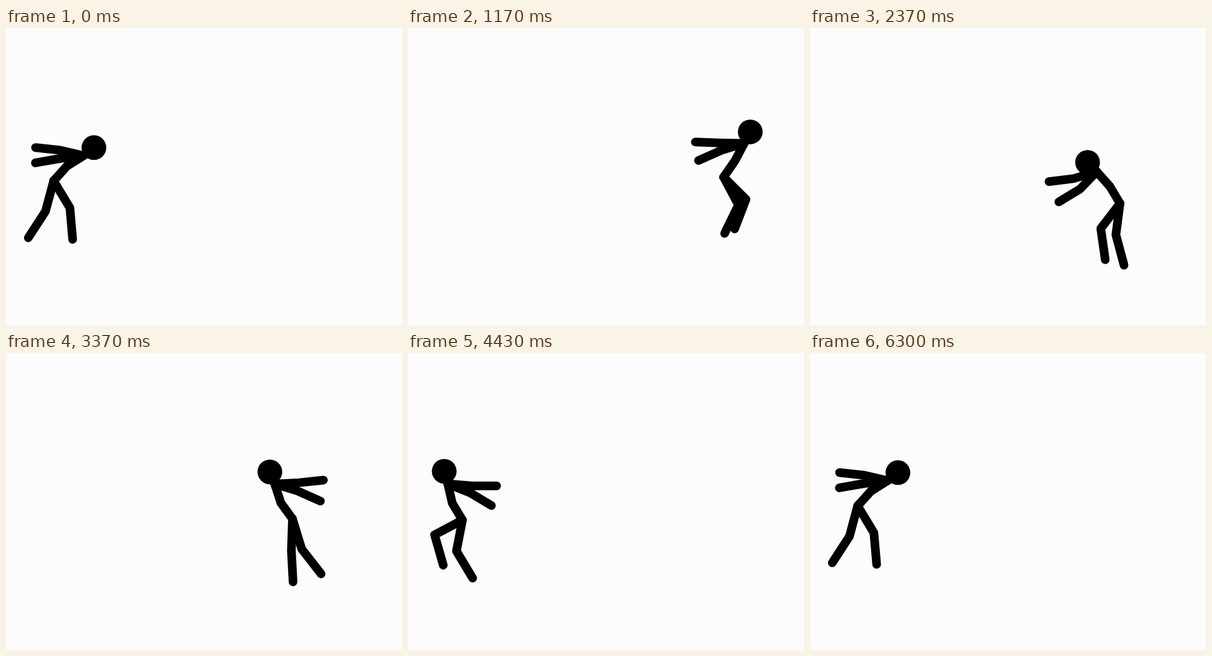
Write an HTML page with a canvas that moves like this. It is 640 px wide and 480 px high and loops after 6.36 s.

```html
<!DOCTYPE html>
<html lang="en">
<head>
<meta charset="utf-8">
<title>Running stick figure</title>
<style>
  html, body { margin: 0; width: 100%; height: 100%; overflow: hidden; background: #fcfcfd; }
  canvas { display: block; }
</style>
</head>
<body>
<canvas id="stage" width="640" height="480"></canvas>
<script>
const ctx = document.getElementById('stage').getContext('2d');
const LOOP = 6360, FPS = 30, LAST = 189;

// Joint angles in degrees for a figure facing right: 0 is right, 90 is down.
// Upper body: lower back, upper back, neck, then both arms (upper, lower).
const lean = [-48, -32, -38, 193, 186, 173, 170];
const jog = [-54, -72, -68, 183, 186, 163, 156];
const climb = [-59, -77, -74, 175, 180, 158, 149];
const flip = [180, 194.5, 196, 236, 233, 236, 233];
const armsUp = [-84, -88, -88, -80, -86, -98, -92];
const reach = [-60, -45, -42, 10, 0, 35, 20];
const ready = [-54, -72, -68, 65, 55, 125, 110];
const fall = [-94, -79, -79, -13, -7, 54, 46];

// Legs: thigh and shin of each.
const tuck = [-54, 22, -87, -31];
const land = [50, 100, 80, 105];
const crouch = [10, 90, 40, 125];
const stand = [70, 85, 100, 105];
const push = [128, 140, 60, 85];
const drop = [29, 92, 62, 100];

// One leg through a full running cycle; the other is half a cycle away.
const cycle = [[105, 123], [87, 121], [28, 106], [59, 85], [54, 83], [79, 121]];
const stride = i => [...cycle[i % 6], ...cycle[(i + 3) % 6]];

const keys = [];
function key(frame, x, y, upper, legs, facing = 1, turn = 0) {
  const angles = [...upper, ...legs].map(a => (facing > 0 ? a : 180 - a) + turn);
  keys.push({ frame, x, y, angles });
}

// Run right, gathering speed
for (let i = 0; i <= 20; i++) {
  const f = i <= 13 ? i * 22 / 13 : 22 + (i - 13) * 11 / 7;
  const x = f <= 22 ? 77 + 2.75 * f + 0.34 * f * f : 302 + 15.3 * (f - 22);
  key(f, x, 247, lean, stride(i));
}
// Up the right wall and backflip
key(36, 530, 238, climb, stride(5));
key(39, 575, 222, climb, stride(8), 1, -15);
key(44, 553, 190, climb, stride(11), 1, -60);
key(49, 549, 175, flip, tuck);
key(52, 518, 160, flip, tuck, 1, -80);
key(55, 478, 215, flip, tuck, 1, -170);
key(58, 485, 278, armsUp, land);
// Crouch, turn round, wait
key(63, 482, 300, reach, crouch);
key(70, 500, 285, reach, land, -1);
key(78, 508, 273, ready, stand, -1);
key(85, 508, 270, ready, stand, -1);
key(90, 508, 270, ready, stand, -1);
// Run left
const leftX = n => 463 - 7.08 * n - 0.177 * n * n;
key(101, 463, 268, jog, [107, 128, 88, 93], -1);
for (let i = 0; i < 12; i++) {
  const n = 3 + i * 25 / 12;
  key(101 + n, leftX(n), 268 + 12 * Math.min(1, n / 8), jog, stride(i), -1);
}
key(129, 126, 278, jog, push, -1);
// Up the left wall
key(133, 88, 270, climb, stride(2), -1);
key(137, 72, 245, climb, stride(5), -1, 15);
key(142, 74, 205, climb, stride(8), -1, 30);
key(146, 74, 176, climb, stride(11), -1, 30);
key(150, 70, 160, climb, stride(14), -1, 10);
// Turn in the air, drop, get up
key(157, 67, 262, fall, drop);
key(161, 85, 312, fall, land);
key(164, 95, 328, reach, crouch);
key(169, 86, 312, fall, land);
key(177, 80, 264, armsUp, stand);
key(187, 78, 247, lean, stride(0));
key(LAST, 77, 247, lean, stride(0));

const mix = (a, b, k) => a + (b - a) * k;
const mixAngle = (a, b, k) => a + (((b - a + 180) % 360 + 360) % 360 - 180) * k;

function poseAt(frame) {
  const i = Math.max(1, keys.findIndex(k => k.frame >= frame - 1e-6));
  const a = keys[i - 1], b = keys[i];
  const k = (frame - a.frame) / (b.frame - a.frame);
  return {
    x: mix(a.x, b.x, k),
    y: mix(a.y, b.y, k),
    angles: a.angles.map((v, j) => mixAngle(v, b.angles[j], k))
  };
}

// Strokes a chain of bones and returns its points.
function limb(start, angles, lengths) {
  const points = [start];
  angles.forEach((deg, i) => {
    const [x, y] = points[i], a = deg * Math.PI / 180;
    points.push([x + lengths[i] * Math.cos(a), y + lengths[i] * Math.sin(a)]);
  });
  ctx.beginPath();
  points.forEach(p => ctx.lineTo(...p));
  ctx.stroke();
  return points;
}

function draw() {
  const time = performance.now() % LOOP;
  const frame = Math.min(LAST, Math.floor((time + 4) * FPS / 1000));
  const { x, y, angles } = poseAt(frame);
  ctx.fillStyle = '#fcfcfd';
  ctx.fillRect(0, 0, 640, 480);
  ctx.fillStyle = ctx.strokeStyle = '#000';
  ctx.lineWidth = 14;
  ctx.lineCap = ctx.lineJoin = 'round';

  const hip = [x, y];
  const [, , neck, head] = limb(hip, angles.slice(0, 3), [32, 32, 21]);
  for (const i of [3, 5]) limb(neck, angles.slice(i, i + 2), [39, 40]);
  for (const i of [7, 9]) limb(hip, angles.slice(i, i + 2), [51, 51]);
  ctx.beginPath();
  ctx.arc(...head, 20, 0, 2 * Math.PI);
  ctx.fill();
  requestAnimationFrame(draw);
}
draw();
</script>
</body>
</html>
```
